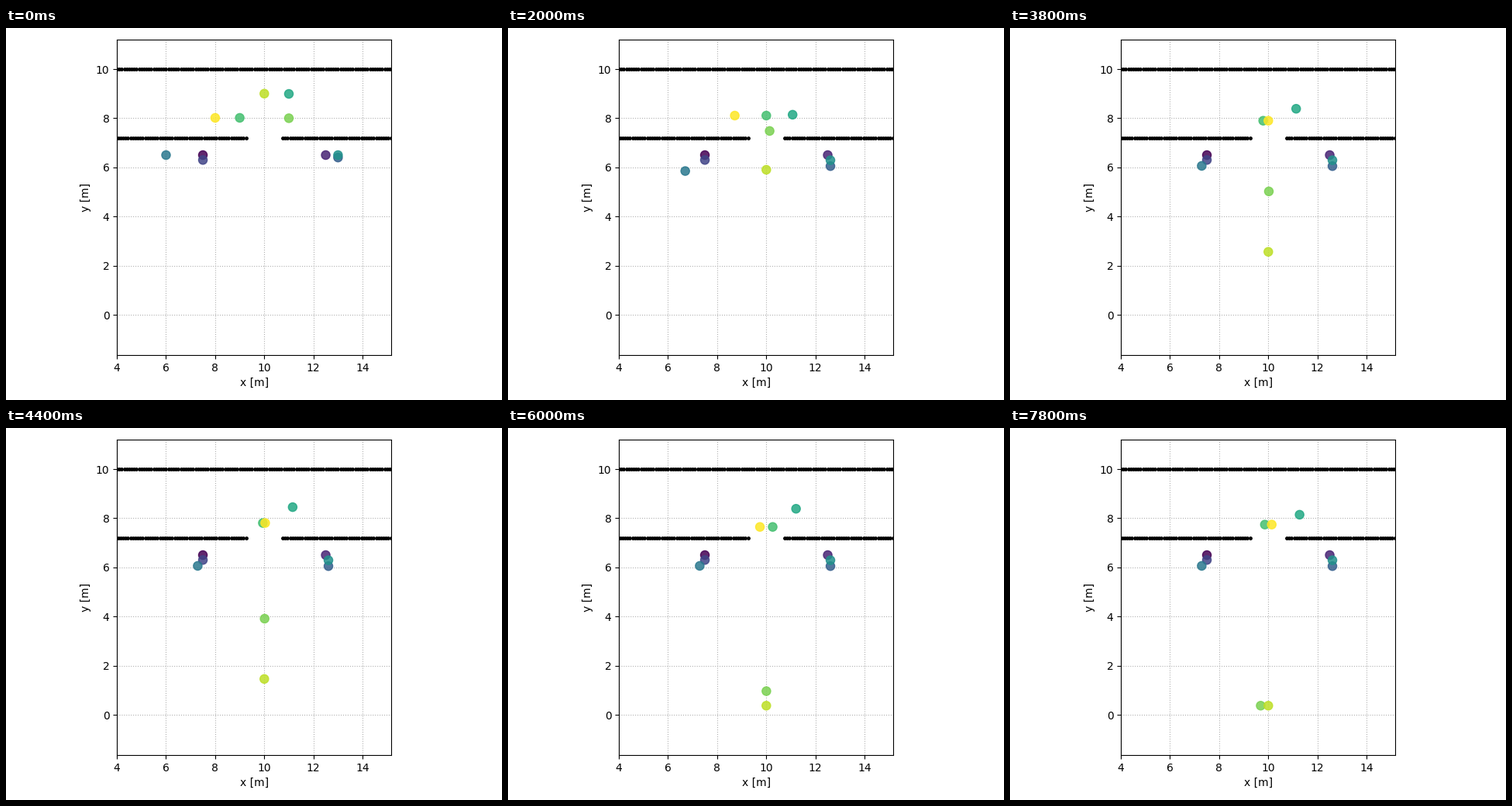
These frames come from a looping animation (640x480 px, 8000 ms). A matplotlib script:

```python
import numpy as np
import matplotlib.pyplot as plt
from matplotlib.animation import FuncAnimation

W, H = 640, 480
FRAMES, STEP = 40, 200
SCALE = 31.7                      # pixels per metre
LEFT, RIGHT, TOP, BOTTOM = 143.1, 497.1, 15, 422
X0, Y0 = 4.0, -1.64
DOOR_X, DOOR_Y, FLOOR = 10, 7.4, 0.37
SPEED = 1.84                      # walking speed in m/s


def settle(a, b, rate, t):
    return b + (a - b) * np.exp(-rate * t)


def still(x, y):
    return lambda t: (x, y)


def walk(*keys):
    """Go through (seconds, x, y) waypoints and rest at the last one."""
    s, x, y = np.array(keys).T
    return lambda t: (np.interp(t, s, x), np.interp(t, s, y))


def leave(x, y, rate, start, park):
    """Reach the door, walk straight down and stop beside x = park."""
    def at(t):
        down = SPEED * max(0, t - start)
        py = max(FLOOR, settle(y, DOOR_Y, rate, t) - down)
        px = settle(x, DOOR_X, rate, t)
        return np.interp(py, [FLOOR, 0.7], [park, px]), py
    return at


def queue(x, arrive, power, sway):
    """Drift to the door, then jostle from side to side in front of it."""
    def at(t):
        drift = (DOOR_X - x) * min(1, t / arrive) ** power
        push = sway * np.clip(t - arrive, 0, 1) * np.sin(1.16 * (t - 4.6))
        return x + drift + push, 7.88 + 0.24 * np.cos(0.65 * (t - 1.5))
    return at


def linger(x, y):
    """Step forward, then sway slowly while waiting."""
    return lambda t: (x + 0.035 * t,
                      settle(y, 8.3, 4, t) + 0.17 * np.cos(0.95 * (t - 4.9)))


# People from the darkest to the brightest colour
people = [
    still(7.5, 6.5),
    still(12.5, 6.5),
    still(7.5, 6.3),
    walk((0, 13, 6.4), (0.8, 12.82, 5.63), (2, 12.61, 6.05)),
    walk((0, 6, 6.5), (0.8, 6.68, 5.58), (2, 6.7, 5.85),
         (3.6, 7.05, 6.0), (3.8, 7.29, 6.06)),
    walk((0, 13, 6.5), (0.8, 12.61, 6.29)),
    linger(11, 9),
    queue(9, arrive=2, power=1, sway=0.26),
    leave(11, 8, rate=1, start=2.5, park=9.69),
    leave(10, 9, rate=2, start=1.17, park=10),
    queue(8, arrive=3.8, power=1.6, sway=-0.26),
]

fig = plt.figure(figsize=(W / 100, H / 100), dpi=100)
ax = fig.add_axes([LEFT / W, 1 - BOTTOM / H,
                   (RIGHT - LEFT) / W, (BOTTOM - TOP) / H])
ax.set_xlim(X0, X0 + (RIGHT - LEFT) / SCALE)
ax.set_ylim(Y0, Y0 + (BOTTOM - TOP) / SCALE)
ax.set_xticks(range(4, 15, 2))
ax.set_yticks(range(0, 11, 2))
ax.set_xlabel("x [m]")
ax.set_ylabel("y [m]")
ax.grid(True, linestyle=":")


def wall(start, end, y):
    x = np.arange(start, end + 0.01, 0.1)
    ax.plot(x, np.full(len(x), y), "k.", markersize=5)


wall(4, 16, 10)
wall(4.05, 9.25, 7.2)
wall(10.75, 16, 7.2)


def positions(frame):
    t = frame * STEP / 1000
    return np.array([path(t) for path in people])


colors = plt.get_cmap("viridis")(np.linspace(0, 1, len(people)))
dots = ax.scatter(*positions(0).T, s=64, c=colors, alpha=0.85, zorder=3)


def update(frame):
    dots.set_offsets(positions(frame))
    return [dots]


anim = FuncAnimation(fig, update, frames=FRAMES, interval=STEP,
                     repeat=True, repeat_delay=0)
plt.show()
```
